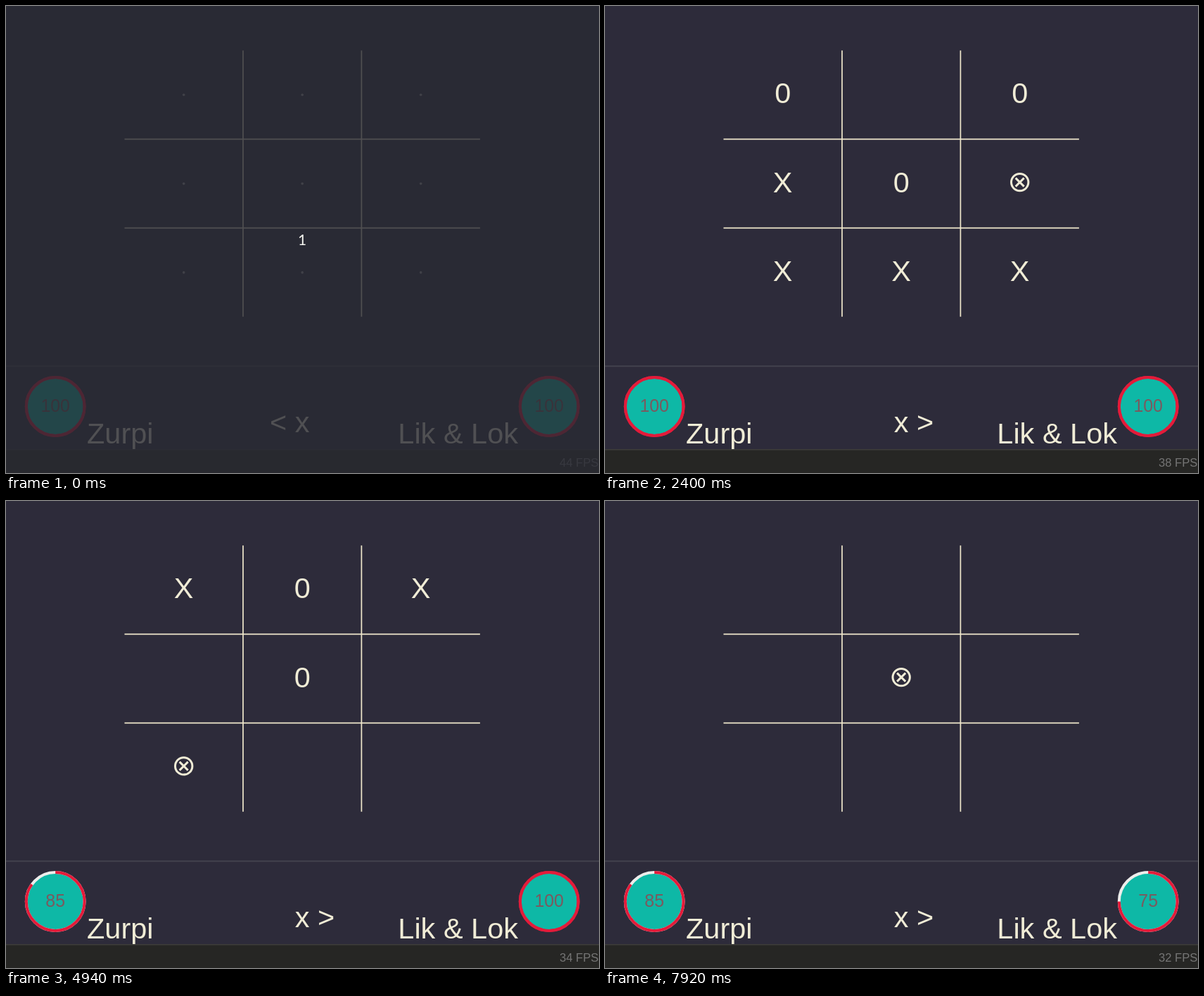
Recreate the animation shown at these times as an HTML page. Size 843 by 664 pixels, loop 8000 ms.

```html
<!DOCTYPE html>
<html lang="en">
<head>
<meta charset="utf-8">
<title>Tic-tac-toe duel</title>
<style>
html, body { margin: 0; width: 100%; height: 100%; overflow: hidden; background: #2d2b3a; }
svg { display: block; width: 843px; height: 664px; font: 41.5px "Liberation Sans", Arial, sans-serif; }
text { fill: #f0ecd6; white-space: pre; }
.mid { text-anchor: middle; }
.end { text-anchor: end; }
.grid { stroke: #f0e8cc; stroke-width: 1.7; }
.dot { fill: #a3a1a2; }
.ring { fill: none; stroke-width: 4; }
.hp { font-size: 24.9px; fill: #7a5a5f; }
.fps { font-size: 16.6px; fill: #757575; }
.both { fill: none; stroke: #f0ecd6; stroke-width: 3; }
.count { font: 21px Lato, sans-serif; fill: #f8f8f2; }
</style>
</head>
<body>
<svg viewBox="0 0 843 664">
  <rect width="843" height="664" fill="#2d2b3a"/>
  <path class="grid" d="M337 63.2V441.8M505.4 63.2V441.8M168.5 189.4H673.9M168.5 315.7H673.9"/>
  <g id="board"></g>
  <rect y="511" width="843" height="2.2" fill="#403f4b"/>
  <rect y="630" width="843" height="34" fill="#262624"/>
  <rect y="630" width="843" height="1.6" fill="#3d3d3a"/>
  <g id="gauges"></g>
  <g id="names">
    <text x="115" y="622">Zurpi</text>
    <text class="end" x="728" y="622">Lik &amp; Lok</text>
    <text id="left" class="end" x="431.6" y="606">&lt; x</text>
    <text id="right" x="410.8" y="606">x &gt;</text>
  </g>
  <text id="message" class="mid" x="421.2" y="581"></text>
  <text id="fps" class="fps end" x="842.4" y="655"></text>
  <rect id="veil" width="843" height="664" fill="#282a32"/>
  <text id="count" class="count mid" x="421.2" y="339.5">1</text>
</svg>
<script>
const LOOP = 8000;
const $ = id => document.getElementById(id);
const show = (id, on) => { $(id).style.display = on ? '' : 'none'; };

// Board cells: '.' open, ' ' closed, '@' both marks.
const steps = [
  [0, { board: '.........', turn: 'left', msg: '', hp: [100, 100], fps: 44, veil: 0.8, count: true }],
  [20, { veil: 0.4, count: false }],
  [120, { veil: 0 }],
  [400, { board: '...X.....' }],
  [720, { board: '   X     ', turn: 'right', fps: 43 }],
  [860, { board: '   X0    ' }],
  [1000, { fps: 42 }],
  [1140, { board: '   X0   X' }],
  [1280, { board: '  0X0   X' }],
  [1420, { fps: 41 }],
  [1580, { board: ' .0X0@ .X', turn: 'left' }],
  [1680, { board: '  0X0@ XX', turn: 'right', fps: 40 }],
  [1800, { board: '  0X0@XXX' }],
  [1980, { fps: 38 }],
  [2300, { board: '0 0X0@XXX' }],
  [2460, { fps: 37 }],
  [2620, { msg: '15 damage to you!', hp: [85, 100] }],
  [2780, { fps: 36 }],
  [2920, { fps: 35 }],
  [3320, { fps: 36 }],
  [3440, { board: '         ', msg: '' }],
  [3580, { board: 'X        ' }],
  [3720, { board: 'X0       ' }],
  [3840, { fps: 35 }],
  [4120, { board: 'X0..@....', turn: 'left', fps: 34 }],
  [4260, { fps: 33 }],
  [4400, { board: 'X0X.@....' }],
  [4540, { fps: 34 }],
  [4660, { board: 'X0X.. @. ' }],
  [4940, { board: 'X0X 0 @  ', turn: 'right' }],
  [5280, { fps: 33 }],
  [5640, { fps: 34 }],
  [5780, { board: 'X0X 0 @X ' }],
  [5920, { fps: 32 }],
  [6100, { board: 'X0X 0 @XX' }],
  [6220, { fps: 33 }],
  [6320, { board: 'X0X.000XX', turn: 'left' }],
  [6620, { board: 'X0X@000XX' }],
  [6760, { fps: 32 }],
  [6900, { fps: 33 }],
  [7200, { msg: '25 damage to Lik & Lok!', hp: [85, 75] }],
  [7320, { fps: 32 }],
  [7480, { fps: 33 }],
  [7620, { fps: 34 }],
  [7780, { board: '         ', msg: '', turn: 'right' }],
  [7920, { board: '    @    ', fps: 32 }]
];

let last = {};
const states = steps.map(([time, change]) => {
  last = { ...last, ...change };
  return { time, ...last };
});

function cell(mark, i) {
  const x = 252.7 + 168.5 * (i % 3);
  const y = 126.3 * (1 + Math.floor(i / 3));
  if (mark === ' ') return '';
  if (mark === '.') return `<circle class="dot" cx="${x}" cy="${y}" r="1.8"/>`;
  if (mark === '@') {
    return `<g class="both" transform="translate(${x} ${y - 2})">
      <circle r="12.2"/><path d="M-6-6 6 6M6-6-6 6"/></g>`;
  }
  return `<text class="mid" x="${x}" y="${y + 12}">${mark}</text>`;
}

function gauge(hp, i) {
  return `<g transform="translate(${70.2 + 702 * i} 569.5)">
    <circle r="41" fill="#0eb8a6"/>
    <circle class="ring" r="41.4" stroke="${hp < 100 ? '#ededeb' : '#e31b3a'}"/>
    <circle class="ring" r="41.4" stroke="#e31b3a" pathLength="100"
      stroke-dasharray="${hp} ${100 - hp}" transform="rotate(-90)"/>
    <text class="hp mid" y="7.5">${hp}</text></g>`;
}

function draw(s) {
  $('board').innerHTML = [...s.board].map(cell).join('');
  $('gauges').innerHTML = s.hp.map(gauge).join('');
  show('names', !s.msg);
  show('left', s.turn === 'left');
  show('right', s.turn === 'right');
  $('message').textContent = s.msg;
  $('fps').textContent = s.fps + ' FPS';
  $('veil').setAttribute('opacity', s.veil);
  show('count', s.count);
}

const start = performance.now();
let current;
function tick() {
  const t = (performance.now() - start) % LOOP;
  const next = states.findLast(s => s.time <= t);
  if (next !== current) draw(current = next);
  requestAnimationFrame(tick);
}
tick();
</script>
</body>
</html>
```
